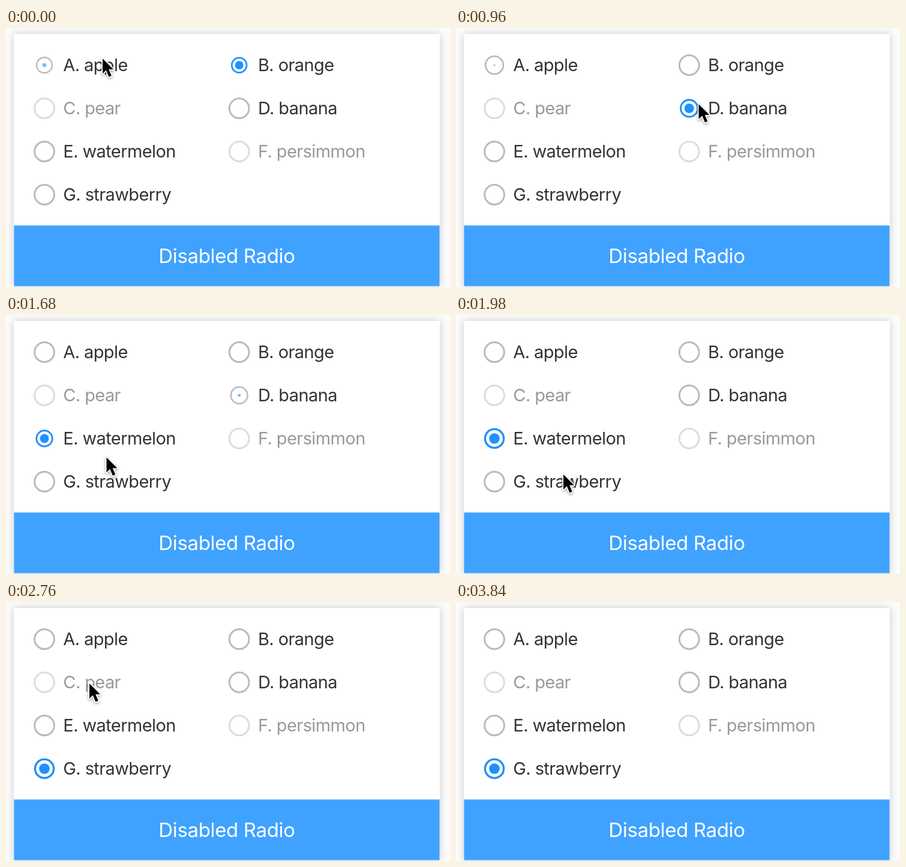
An HTML page that plays this animation: 740 px wide and 432 px high, repeating every 4.02 s.

```html
<!DOCTYPE html>
<html lang="en">
<head>
<meta charset="utf-8">
<title>Disabled Radio</title>
<style>
  html, body { margin: 0; width: 100%; height: 100%; overflow: hidden; background: #fcfcfc; }
  svg { display: block; width: 740px; height: 432px; }
  text { font-family: Inter, "Open Sans", sans-serif; }
  .label { font-size: 29px; letter-spacing: -.6px; fill: #333; }
  .title { font-size: 33px; letter-spacing: -.35px; fill: #fff; text-anchor: middle; }
  .card { fill: #fff; filter: drop-shadow(0 0 7px rgba(0, 0, 0, .2)); }
  .band { fill: #40a2ff; }
  .off { fill: none; stroke: #bbb; stroke-width: 3; }
  .on { fill: none; stroke: #1e90ff; stroke-width: 3.4; }
  .dot { fill: #1e90ff; stroke: none; }
  .disabled .label { fill: #999; }
  .disabled .off { stroke: #ddd; }
  #cursor { filter: drop-shadow(0 2px 2px rgba(0, 0, 0, .35)); }
  #cursor path { fill: #000; stroke: #fff; stroke-width: 3.4; paint-order: stroke; stroke-linejoin: round; }
</style>
</head>
<body>
<svg viewBox="0 0 740 432">
  <rect class="card" x="13" y="10" width="710" height="421"/>
  <rect class="band" x="13.4" y="329.4" width="709.2" height="101.2"/>
  <text class="title" x="368" y="392">Disabled Radio</text>
  <g id="radios"></g>
  <g id="cursor"><path d="M1 1V26L6.8 20.5L11.4 31.5L15.8 29.6L11.2 19H19Z"/></g>
</svg>
<script>
  const LOOP = 4020, STEP = 60, SWITCH = 300;
  const labels = ['A. apple', 'B. orange', 'C. pear', 'D. banana',
                  'E. watermelon', 'F. persimmon', 'G. strawberry'];
  const disabled = [2, 5];

  const first = 1;
  const clicks = [
    { at: -48, pick: 0 },
    { at: 770, pick: 3 },
    { at: 1515, pick: 4 },
    { at: 1992, pick: 6 }
  ];

  // The pointer rests on each place until the next move begins.
  const home = { x: 160, y: 50 };
  const moves = [
    { from: 60, to: 620, x: 403.5, y: 126 },
    { from: 960, to: 1500, x: 155, y: 208 },
    { from: 1560, to: 1800, x: 178, y: 265 },
    { from: 2040, to: 2330, x: 138, y: 135 },
    { from: 2760, to: 3090, x: 455, y: 204 },
    { from: 3380, to: 3840, x: 130, y: 440 }
  ];

  const radios = labels.map((label, i) => {
    const x = 64 + (i % 2) * 324.7, y = 62 + (i >> 1) * 72;
    const g = document.createElementNS('http://www.w3.org/2000/svg', 'g');
    g.setAttribute('transform', `translate(${x} ${y})`);
    if (disabled.includes(i)) g.setAttribute('class', 'disabled');
    g.innerHTML = `<circle class="off" r="16.4"/>
      <g class="on"><circle r="15.6"/><circle class="dot" r="8.8"/></g>
      <text class="label" x="31.3" y="10.3">${label}</text>`;
    document.getElementById('radios').append(g);
    return { off: g.querySelector('.off'), on: g.querySelector('.on') };
  });
  const cursor = document.getElementById('cursor');

  const clamp = p => Math.min(1, Math.max(0, p));
  const smooth = p => p * p * (3 - 2 * p);
  const bezier = (a, b, u) => 3 * a * u * (1 - u) ** 2 + 3 * b * u * u * (1 - u) + u ** 3;

  // CSS "ease", solved by bisection
  function ease(p) {
    let lo = 0, hi = 1;
    for (let n = 0; n < 24; n++) {
      const mid = (lo + hi) / 2;
      if (bezier(.25, .25, mid) < p) lo = mid; else hi = mid;
    }
    return bezier(.1, 1, lo);
  }

  function scale(el, s) {
    el.setAttribute('transform', `scale(${s})`);
    el.setAttribute('visibility', s > .01 ? 'visible' : 'hidden');
  }

  function drawRadios(t) {
    const level = labels.map((_, i) => Number(i === first));
    let last = first;
    for (const { at, pick } of clicks) {
      const k = ease(clamp((t - at) / SWITCH));
      level[last] -= k;
      level[pick] += k;
      last = pick;
    }
    radios.forEach(({ off, on }, i) => {
      scale(on, level[i]);
      scale(off, 1 - level[i]);
    });
  }

  function drawCursor(t) {
    let { x, y } = home;
    for (const m of moves) {
      const k = smooth(clamp((t - m.from) / (m.to - m.from)));
      x += (m.x - x) * k;
      y += (m.y - y) * k;
    }
    cursor.setAttribute('transform', `translate(${x} ${y})`);
  }

  const start = performance.now();
  function tick() {
    const now = (performance.now() - start) % LOOP;
    const t = Math.floor(now / STEP) * STEP;
    drawRadios(t);
    drawCursor(t);
    requestAnimationFrame(tick);
  }
  tick();
</script>
</body>
</html>
```
